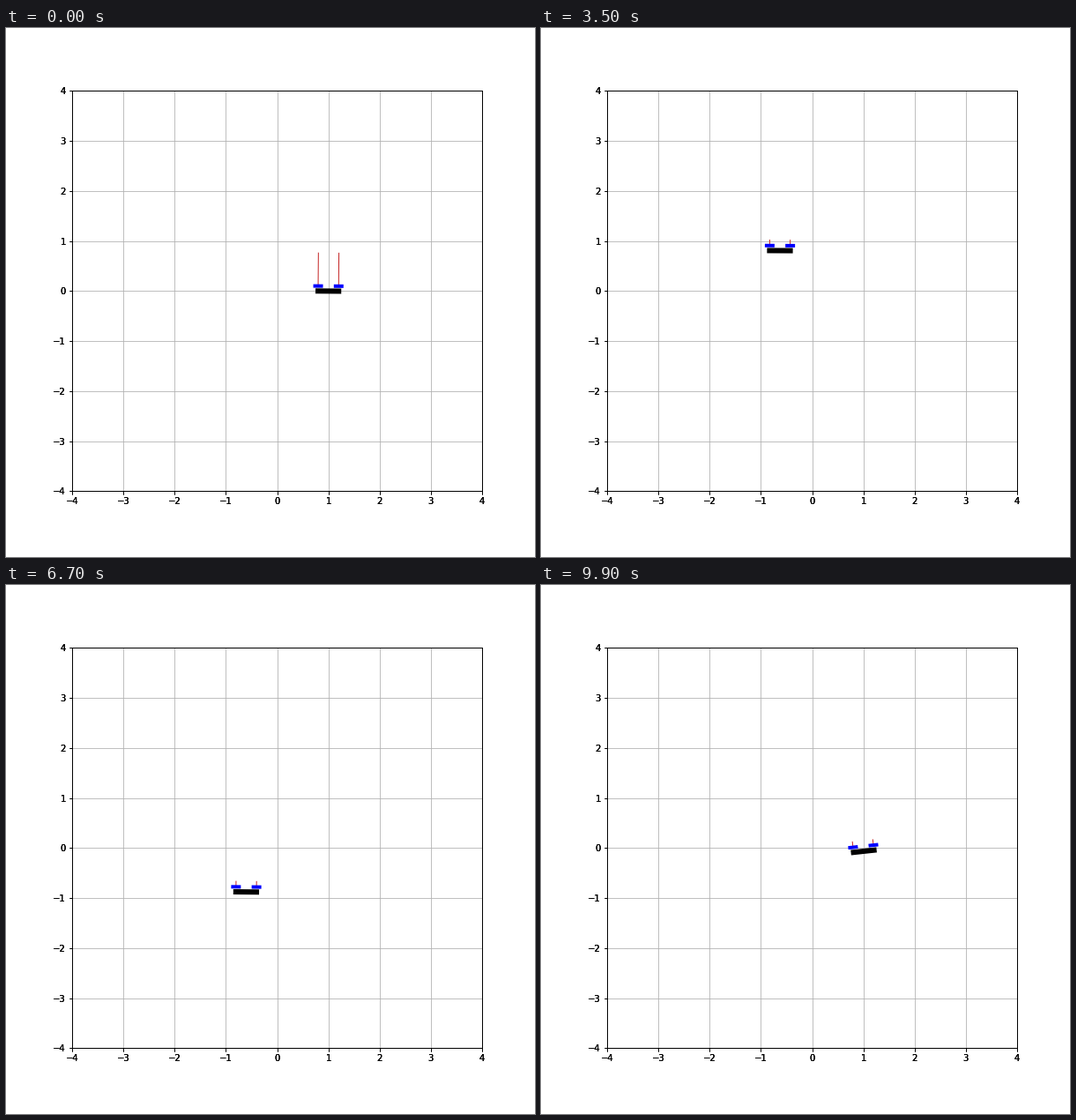
A matplotlib script for the animation above (10 s loop, 600 by 600 pixels).

```python
import numpy as np
import matplotlib.pyplot as plt
from matplotlib.animation import FuncAnimation

SIZE, DPI = 600, 100
PX = 72 / DPI  # points per pixel
FRAMES, INTERVAL = 100, 100
OMEGA = 2 * np.pi / 10
GRAVITY = 9.81
ARM, LIFT, BLADE = 0.2, 0.1, 0.06

# Turning points of the sideways tracking error
DRIFT_T = [0, 1, 2.4, 3.8, 4.8, 5.8, 8.8, 9.9]
DRIFT_X = [0, 0.2, -0.125, -0.03, -0.135, -0.065, -0.34, 0.01]


def drift(t):
    """Cosine easing from one turning point to the next."""
    step = np.interp(t, DRIFT_T, range(len(DRIFT_T)))
    i = min(int(step), len(DRIFT_T) - 2)
    ease = (1 - np.cos(np.pi * (step - i))) / 2
    return DRIFT_X[i] + ease * (DRIFT_X[i + 1] - DRIFT_X[i])


def path_x(t):
    return np.cos(OMEGA * t) + drift(t)


def tilt(t, h=0.25):
    """The body leans into its sideways acceleration."""
    accel = (path_x(t + h) - 2 * path_x(t) + path_x(t - h)) / h ** 2
    return -accel / GRAVITY


def make_axes(fig):
    left, bottom, right, top = 75, 74.6, 540, 528.6
    ax = fig.add_axes([left / SIZE, bottom / SIZE,
                       (right - left) / SIZE, (top - bottom) / SIZE])
    ax.set(xlim=(-4, 4), ylim=(-4, 4), xticks=range(-4, 5), yticks=range(-4, 5))
    ax.grid(True, color="#b0b0b0", linewidth=0.8 * PX)
    ax.tick_params(labelsize=10 * PX, length=3.5 * PX, pad=3.5 * PX, width=0.8 * PX)
    for spine in ax.spines.values():
        spine.set_linewidth(PX)
    return ax


plt.rcParams["font.family"] = "DejaVu Sans"
fig = plt.figure(figsize=(SIZE / DPI, SIZE / DPI), dpi=DPI, facecolor="white")

# Stacked axes give the labels their heavy, overprinted look
for _ in range(3):
    ax = make_axes(fig)


def stroke(color, width, z):
    return ax.plot([], [], color=color, linewidth=width * PX, zorder=z,
                   solid_capstyle="projecting")[0]


thrusts = [stroke("#c42424", 1, 3) for _ in range(2)]
body = stroke("black", 6, 4)
props = [stroke("blue", 4, 5) for _ in range(2)]


def update(frame):
    t = frame * INTERVAL / 1000
    x, y, a = path_x(t), np.sin(OMEGA * t), tilt(t)
    c, s = np.cos(a), np.sin(a)

    def place(line, us, vs):
        us, vs = np.array(us), np.array(vs)
        line.set_data(x + c * us - s * vs, y + s * us + c * vs)

    thrust = 0.11 + 0.55 * np.exp(-t / 0.05)
    place(body, [-ARM, ARM], [0, 0])
    for side, prop, jet in zip((-ARM, ARM), props, thrusts):
        place(prop, [side - BLADE, side + BLADE], [LIFT, LIFT])
        place(jet, [side, side], [LIFT, LIFT + thrust])
    return [body, *props, *thrusts]


anim = FuncAnimation(fig, update, frames=FRAMES, interval=INTERVAL,
                     repeat=True, repeat_delay=0, blit=False)
plt.show()
```
